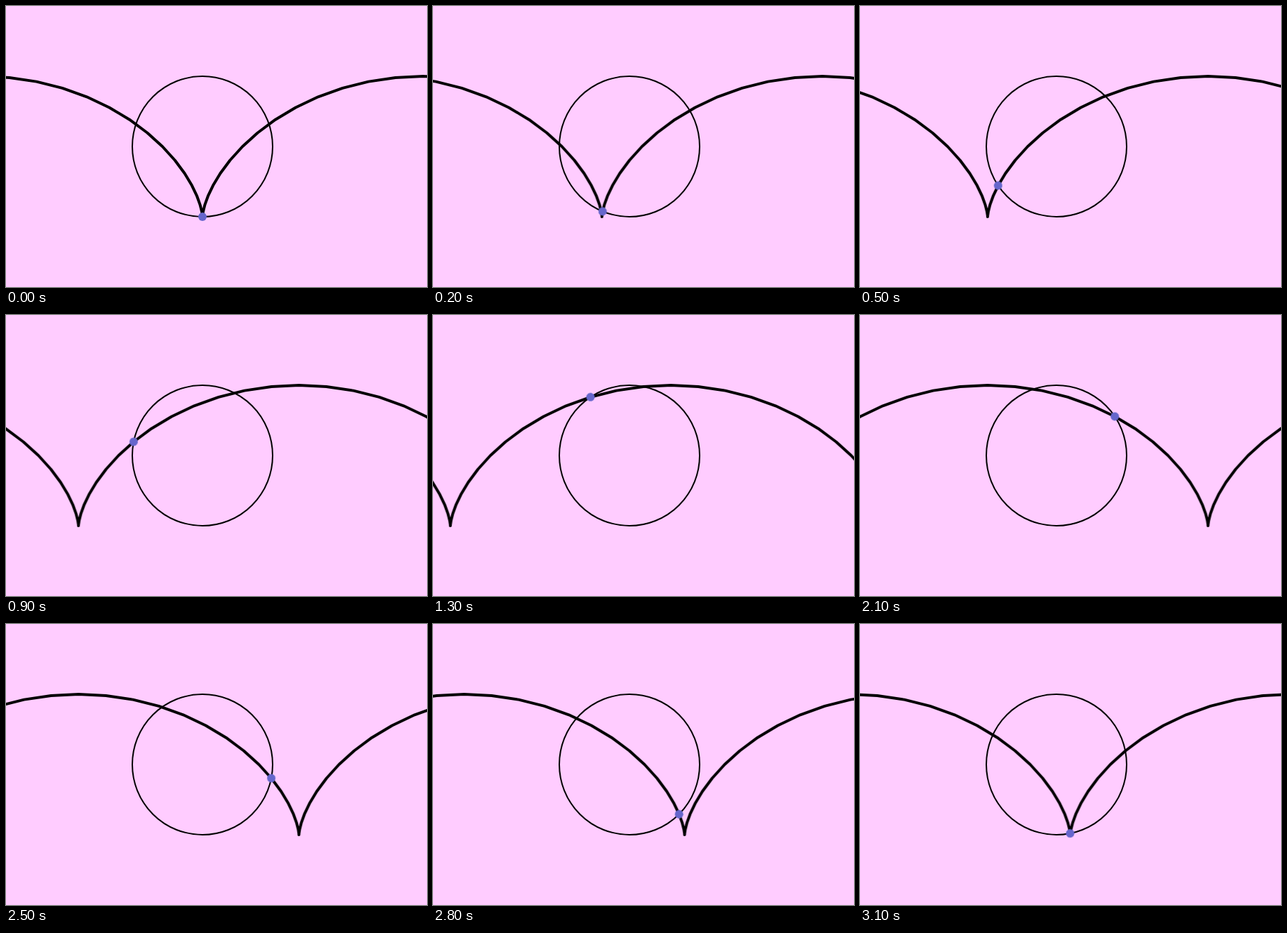
An HTML page for the animation above (3200 ms loop, 600 by 400 pixels).

```html
<!DOCTYPE html>
<html lang="en">
<head>
<meta charset="utf-8">
<title>Cycloid</title>
<style>
  html, body { margin: 0; width: 100%; height: 100%; overflow: hidden; background: #fcf; }
  svg { display: block; width: 600px; height: 400px; }
  #curve {
    fill: none; stroke: #000; stroke-width: 4;
    stroke-linejoin: round; stroke-linecap: round;
    animation: roll 3.2s steps(32) infinite;
  }
  #wheel { fill: none; stroke: #000; stroke-width: 2; }
  #dot {
    fill: #66c;
    transform-origin: 280px 200px;
    animation: turn 3.2s steps(32) infinite;
  }
  @keyframes roll { to { transform: translateX(-628.3185px); } }
  @keyframes turn { to { transform: rotate(360deg); } }
</style>
</head>
<body>
<svg viewBox="0 0 600 400">
  <circle id="wheel" cx="280" cy="200" r="100"/>
  <polyline id="curve"/>
  <circle id="dot" cx="280" cy="300" r="6"/>
</svg>
<script>
  // Cycloid traced by a wheel of radius 100, sampled 32 times per turn.
  const radius = 100, stepsPerTurn = 32;
  const points = [];
  for (let i = -stepsPerTurn; i <= 2 * stepsPerTurn; i++) {
    const angle = i * 2 * Math.PI / stepsPerTurn;
    const x = 280 + radius * (angle - Math.sin(angle));
    const y = 200 + radius * Math.cos(angle);
    points.push(x.toFixed(3) + ',' + y.toFixed(3));
  }
  document.getElementById('curve').setAttribute('points', points.join(' '));
</script>
</body>
</html>
```
